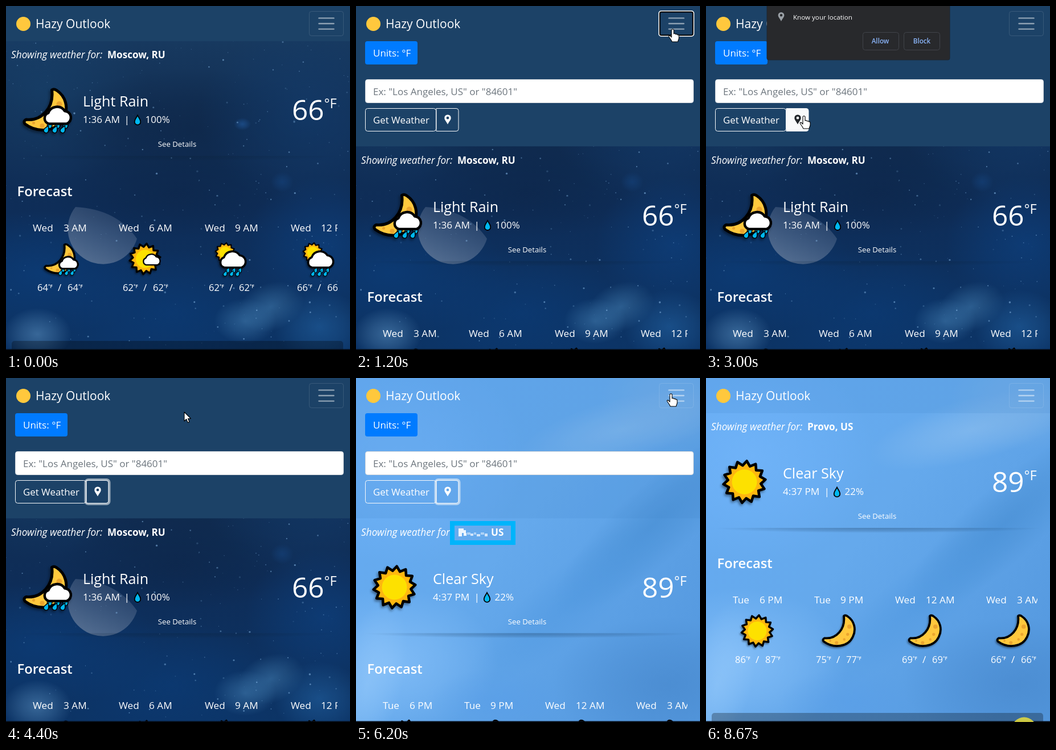
These frames come from a looping animation (604 by 606 pixels, 8740 ms). An HTML page:

```html
<!DOCTYPE html>
<html lang="en">
<head>
<meta charset="utf-8">
<title>Weather app</title>
<style>
  html, body { margin: 0; width: 100%; height: 100%; overflow: hidden; background: #10294d; }
  svg { display: block; width: 100vw; height: 100vh; font-family: "Open Sans", "Noto Sans", sans-serif; fill: #fff; }
  text { white-space: pre; }
  .icon { filter: drop-shadow(-2px 3px 2px rgba(0, 0, 0, .4)); }
</style>
</head>
<body>
<svg id="stage" viewBox="0 0 604 606" preserveAspectRatio="none"></svg>
<script>
const LOOP = 8740, NAV = 62, MENU = 185.5;
const OPEN = [960, 1170], CLOSE = [6480, 6665];

const text = (x, y, size, str, attrs = '') => `<text x="${x}" y="${y}" font-size="${size}" ${attrs}>${str}</text>`;
const rect = (x, y, w, h, attrs) => `<rect x="${x}" y="${y}" width="${w}" height="${h}" ${attrs}/>`;
const circle = (x, y, r, fill) => `<circle cx="${x}" cy="${y}" r="${r}" fill="${fill}"/>`;
const group = (id, body, attrs = '') => `<g id="${id}" ${attrs}>${body}</g>`;

let blobCount = 0;
function blob(x, y, rx, ry, color, opacity, turn = 0) {
  const id = 'blob' + blobCount++;
  return `<radialGradient id="${id}"><stop stop-color="${color}" stop-opacity="${opacity}"/>
    <stop offset=".5" stop-color="${color}" stop-opacity="${opacity * .55}"/>
    <stop offset="1" stop-color="${color}" stop-opacity="0"/></radialGradient>
    <ellipse rx="${rx}" ry="${ry}" fill="url(#${id})" transform="translate(${x} ${y}) rotate(${turn})"/>`;
}

let seed = 7;
const random = () => (seed = seed * 16807 % 2147483647) / 2147483647;

// Backdrops stay fixed while the page moves over them.
function nightSky() {
  let stars = '';
  for (let i = 0; i < 300; i++) {
    stars += `<circle cx="${(random() * 604).toFixed(1)}" cy="${(random() * 606).toFixed(1)}"
      r="${(.5 + random() ** 3 * 1.3).toFixed(2)}" fill="#8fc1ee" opacity="${(.15 + random() * .4).toFixed(2)}"/>`;
  }
  return rect(0, 0, 604, 606, 'fill="url(#night)"')
    + blob(60, 150, 190, 170, '#18446f', .55) + blob(330, 220, 260, 110, '#0d2546', .6)
    + blob(530, 190, 190, 160, '#133f73', .55) + blob(300, 330, 220, 80, '#0c2446', .55)
    + blob(60, 470, 210, 110, '#0b4080', .6) + blob(290, 540, 200, 110, '#0b3c78', .6)
    + blob(560, 420, 140, 120, '#0e4384', .6) + blob(415, 208, 15, 11, '#2563ae', .5)
    + blob(485, 310, 20, 18, '#1b569f', .3) + blob(420, 555, 55, 40, '#3f78ab', .6)
    + blob(465, 530, 60, 42, '#3f78ab', .6, -20) + blob(550, 565, 80, 65, '#2364a5', .55)
    + blob(55, 578, 60, 46, '#4678a9', .75)
    + '<path d="M122 354A62 62 0 1 0 230 410Q195 358 122 354Z" fill="url(#moonGlow)"/>' + stars;
}

const daySky = () => rect(0, 0, 604, 606, 'fill="url(#day)"')
  + blob(80, 140, 220, 190, '#76b8fd', .6) + blob(470, 90, 190, 55, '#8fc0ef', .6, -15)
  + blob(560, 40, 130, 90, '#7db2e6', .6) + blob(520, 260, 230, 65, '#4289cd', .55, -42)
  + blob(380, 390, 240, 60, '#4e97df', .5, -40) + blob(60, 500, 190, 130, '#8cc4fb', .65)
  + blob(20, 540, 60, 150, '#98cbfb', .5, 15) + blob(545, 540, 200, 120, '#4686ca', .6)
  + blob(250, 570, 120, 60, '#579de8', .5);

// Icons are drawn around the origin, about 80 units wide.
const ink = (width) => `stroke="#000" stroke-width="${width}" stroke-linejoin="round"`;

function sun(x = 0, y = 0, scale = 1, n = 14) {
  const points = Array.from({ length: 2 * n }, (_, i) => {
    const r = i % 2 ? 29 : 37, a = (i + .5) * Math.PI / n;
    return `${(r * Math.sin(a)).toFixed(1)},${(-r * Math.cos(a)).toFixed(1)}`;
  });
  return `<g transform="translate(${x} ${y}) scale(${scale})">
    <polygon points="${points.join(' ')}" fill="#ffb70f" ${ink(4.6)}/>${circle(0, 0, 22, '#fde100')}</g>`;
}

const moon = () => `<path d="M12-35Q16-38 21-34C36-24 42-4 33 14C22 38-12 42-35 25Q-39 20-33 17C-6 20 16-4 12-35Z"
  fill="#ffc83d" ${ink(5)}/>` + [[25, -10, 5], [21, 8, 3.5], [-5, 28, 4], [13, 20, 3], [-20, 23, 2.5]]
  .map(([x, y, r]) => circle(x, y, r, '#eba52f')).join('');

const cloud = (x, y, scale, width = 5) => `<path transform="translate(${x} ${y}) scale(${scale})"
  d="M-17 16A11 11 0 0 1-18-5A18 18 0 0 1 14-9A13 13 0 0 1 18 16Z" fill="#fff" ${ink(width)}/>`;

const drop = (x, y, scale, turn = 0) => `<path transform="translate(${x} ${y}) rotate(${turn}) scale(${scale})"
  d="M0-8C2-4 5-1 5 3A5 5 0 0 1-5 3C-5-1-2-4 0-8Z" fill="#00b7f0" stroke="#000" stroke-width="1.700"/>`;

const rain = (x, y) => [[0, 0], [14, 0], [28, 0], [-6, 8], [9, 8], [23, 8]]
  .map(([dx, dy]) => drop(x + dx, y + dy, .85, 25)).join('');

const icons = {
  sun, moon,
  moonRain: () => moon() + rain(9, 26) + cloud(22, 10, .9),
  sunCloud: () => sun() + cloud(16, 2, .78, 4),
  sunRain: () => sun(-15, -15, .62, 12) + rain(-8, 26) + cloud(3, 2, 1.15, 4.2)
};
const icon = (name, x, y, scale) =>
  `<g class="icon" transform="translate(${x} ${y}) scale(${scale})">${icons[name]()}</g>`;

const night = {
  sky: 'Light Rain', time: '1:36 AM', humidity: '100%', dropX: 231, temp: 66, icon: 'moonRain', iconX: 68.5,
  slots: [
    [47, 'Wed', 101, '3 AM', 'moonRain', 94, .71, 55, 64, 64],
    [198, 'Wed', 251, '6 AM', 'sunCloud', 244, .73, 205, 62, 62],
    [349, 'Wed', 402, '9 AM', 'sunRain', 396, .75, 356, 62, 62],
    [500, 'Wed', 553, '12 PM', 'sunRain', 550, .75, 511, 66, 66]
  ]
};
const day = {
  sky: 'Clear Sky', time: '4:37 PM', humidity: '22%', dropX: 230, temp: 89, icon: 'sun', iconX: 67.5,
  slots: [
    [47, 'Tue', 94, '6 PM', 'sun', 90, .75, 51, 86, 87],
    [190, 'Tue', 236, '9 PM', 'moon', 233, .75, 193, 75, 77],
    [332, 'Wed', 386, '12 AM', 'moon', 384, .75, 344, 69, 69],
    [492, 'Wed', 546, '3 AM', 'moon', 539, .75, 500, 66, 66]
  ]
};

const slot = ([dayX, dayName, hourX, hour, name, x, scale, tempX, low, high]) =>
  text(dayX, 397, 17.2, dayName) + text(hourX, 397, 17.2, hour) + icon(name, x, 445.5, scale)
  + text(tempX, 502, 16.5, low) + text(tempX + 19, 497, 8, '°F', 'font-weight="600"')
  + text(tempX + 36, 502, 17, '/') + text(tempX + 53, 502, 16.5, high)
  + text(tempX + 72, 497, 8, '°F', 'font-weight="600"');

const weather = (id, w) => group(id,
  icon(w.icon, w.iconX, 183, 1) + text(135, 177, 25.1, w.sky) + text(135, 206, 17.2, w.time) + text(207.5, 206, 17.2, '|')
  + drop(w.dropX, 201, 1.05) + text(w.dropX + 13.5, 206, 17, w.humidity)
  + `<g class="temp">${text(502, 201, 49.5, w.temp)}${text(558.5, 180, 23.5, '°F')}</g>`
  + `<g class="details">${text(300.5, 248, 13.2, 'See Details', 'text-anchor="middle"')}</g>`
  + `<g clip-path="url(#forecastClip)">${w.slots.map(slot).join('')}</g>`);

const mosaic = [[180, 265, 9, 8], [180, 273, 6, 6], [189, 268, 4, 5], [189, 273, 5, 5], [195, 272, 6, 4], [201, 274, 5, 4],
  [207, 272, 4, 4], [212, 275, 6, 4], [219, 272, 6, 4], [226, 274, 5, 5]]
  .map(([x, y, w, h], i) => rect(x, y - MENU, w, h, `fill="#f4f9ff" opacity="${i < 4 ? .95 : i % 2 ? .75 : .5}"`)).join('');

const pin = (x, y, scale) => `<path transform="translate(${x} ${y}) scale(${scale})" fill-rule="evenodd"
  d="M0 9C-2 4-6 1-6-3A6 6 0 0 1 6-3C6 1 2 4 0 9ZM0-5.5A2.5 2.5 0 1 0 0-.5A2.5 2.5 0 1 0 0-5.5Z"/>`;

const bars = [21.4, 31, 40.6].map(y => `<path d="M549.500 ${y}H575.500"/>`).join('');
const bold = 'font-weight="700"';

stage.innerHTML = `<defs>
  <linearGradient id="night" x2="0" y2="1"><stop stop-color="#1a3e65"/><stop offset=".3" stop-color="#122f54"/>
    <stop offset=".6" stop-color="#0e2d58"/><stop offset="1" stop-color="#0c3466"/></linearGradient>
  <linearGradient id="day" x2="1" y2=".8"><stop stop-color="#65abf2"/><stop offset=".5" stop-color="#65a9ec"/>
    <stop offset="1" stop-color="#5599df"/></linearGradient>
  <linearGradient id="moonGlow" x1=".1" y1="1" x2=".7" y2="0"><stop stop-color="#8392a9" stop-opacity=".65"/>
    <stop offset="1" stop-color="#5c7294" stop-opacity=".28"/></linearGradient>
  <radialGradient id="shade"><stop stop-color="#0a2038" stop-opacity=".28"/>
    <stop offset=".6" stop-color="#0a2038" stop-opacity=".15"/><stop offset="1" stop-color="#0a2038" stop-opacity="0"/></radialGradient>
  <clipPath id="forecastClip"><rect id="forecastWindow" x="20" y="360" width="562" height="200"/></clipPath>
  <clipPath id="shadeClip">${rect(0, 264, 604, 20, '')}</clipPath>
  <clipPath id="navClip"><rect id="navWindow" width="604" height="62"/></clipPath>
  </defs>`
  + group('nightSky', nightSky()) + group('daySky', daySky())
  + group('page',
    text(9, 92, 17.3, 'Showing weather for:', 'font-style="italic"')
    + group('nightCity', text(178, 92, 17.1, 'Moscow, RU', bold))
    + group('dayCity', text(178, 92, 17.1, 'Provo, US', bold))
    + group('hiddenCity', mosaic + text(237, 92, 17.1, 'US', bold))
    + '<ellipse cx="302" cy="264" rx="290" ry="9" fill="url(#shade)" clip-path="url(#shadeClip)"/>'
    + text(19.5, 335, 23.8, 'Forecast', 'font-weight="600"')
    + weather('nightWeather', night) + weather('dayWeather', day)
    + rect(10, 590, 582, 100, 'rx="5" fill="#000" opacity=".28"'))
  + group('nav', '<rect id="navBack" width="604"/>'
    + circle(30.5, 31.5, 12.5, '#ffc83d') + text(52, 38.5, 21, 'Hazy Outlook')
    + rect(16, 62, 92, 41, 'rx="4" fill="#007bff"') + text(30, 89, 17, 'Units: °F')
    + rect(16.5, 129.5, 576, 41, 'rx="4" stroke="#ced4da"')
    + text(30, 157, 17, 'Ex: "Los Angeles, US" or "84601"', 'fill="#6c757d"')
    + rect(16.5, 180.5, 124, 40, 'rx="4" fill="none" stroke="#f8f9fa"') + text(30, 207, 16.9, 'Get Weather')
    + rect(139.5, 179, 42, 43, 'id="pinFocus" rx="5" fill="none" stroke="#f8f9fa" stroke-opacity=".55" stroke-width="4"')
    + '<path id="pinButton" d="M141 180.500H176Q180 180.500 180 184.500V216.500Q180 220.500 176 220.500H141Z" stroke="#f8f9fa"/>'
    + group('pinIcon', pin(161, 200, .95))
    + rect(532.5, 9.5, 60, 43, 'rx="4" fill="none" stroke="#fff" stroke-opacity=".12"')
    + `<g stroke="#fff" stroke-opacity=".5" stroke-width="2.400" stroke-linecap="round">${bars}</g>`
    + group('menuFocus', rect(532, 9, 61, 44, 'rx="4" stroke="#fff" stroke-width="2"')
      + rect(533.5, 10.5, 58, 41, 'rx="3" stroke="#000" stroke-width="2"'), 'fill="none"'), 'clip-path="url(#navClip)"')
  + rect(169, 256, 107, 34, 'id="callout" fill="none" stroke="#00b4fb" stroke-width="8"')
  + group('prompt', rect(107, -4, 321, 99, 'rx="3" fill="#28292c" stroke="#1d2630"')
    + `<g fill="#9aa0a6">${pin(132, 19, .9)}</g>` + text(153, 24, 11.6, 'Know your location')
    + rect(275.5, 46.5, 63, 31, 'id="allow" rx="4" stroke="#41444a"')
    + rect(347.5, 46.5, 63, 31, 'rx="4" fill="none" stroke="#41444a"')
    + text(306, 66, 11.7, 'Allow', 'fill="#8ab4f8" font-weight="600" text-anchor="middle"')
    + text(379, 66, 11.7, 'Block', 'fill="#8ab4f8" font-weight="600" text-anchor="middle"'))
  + rect(0, 604.5, 604, 2, 'fill="#050b14"')
  + group('clickSpot', circle(558.5, 619, 21.5, '#e6dc3c'), 'opacity=".85"')
  + group('cursor',
    '<path id="arrow" d="M0 0V16L3.700 12.500L6.300 18.500L9 17.300L6.500 11.500H11.500Z"/>'
    + `<path id="hand" d="M-2 1Q0-1.500 2 1V8Q4 6.500 5.500 9Q7.500 7.500 8.500 10Q11 9 11 12V16Q10 19 9 22H-1Q-3 18-6 14
      Q-8 11-5 11L-2 14Z"/>`, 'stroke="#000" stroke-width="1.100" stroke-linejoin="round"');

const $ = id => document.getElementById(id);
const show = (id, on) => $(id).setAttribute('display', on ? 'inline' : 'none');
const set = (id, name, value) => $(id).setAttribute(name, value);
const ease = u => u * u * (3 - 2 * u);
const progress = (t, [from, to]) => ease(Math.min(1, Math.max(0, (t - from) / (to - from))));
const inside = ([x, y], left, top, right, bottom) => x >= left && x <= right && y >= top && y <= bottom;

const route = [[70, 575, 625], [800, 556, 41], [1270, 556, 41], [2060, 172, 194], [3330, 172, 194], [4130, 313, 60],
  [5470, 313, 60], [6130, 553, 28], [6870, 553, 28], [7330, 560, 56], [7600, 560, 56], [8400, 558, 625], [LOOP, 558, 625]];

function cursorAt(t) {
  const next = route.findIndex(stop => stop[0] > t);
  if (next < 1) return [575, 625];
  const [t0, x0, y0] = route[next - 1], [t1, x1, y1] = route[next];
  const u = progress(t, [t0, t1]);
  return [x0 + (x1 - x0) * u, y0 + (y1 - y0) * u];
}

function draw(t) {
  const isDay = t >= 4660, wide = isDay && t < 5060;
  const open = progress(t, OPEN) - progress(t, CLOSE);
  const masked = isDay && t < CLOSE[0];
  const navHeight = NAV + MENU * open;

  for (const part of ['Sky', 'Weather']) {
    show('night' + part, !isDay);
    show('day' + part, isDay);
  }
  show('nightCity', !isDay);
  show('dayCity', isDay && !masked);
  show('hiddenCity', masked);

  set('page', 'transform', `translate(0 ${navHeight - NAV})`);
  set('navBack', 'height', navHeight);
  set('navWindow', 'height', navHeight);
  set('navBack', 'fill', isDay ? 'rgba(65,132,198,.16)' : '#1c4267');
  document.querySelectorAll('.temp').forEach(el => el.setAttribute('transform', `translate(${wide ? 8 : 0} 0)`));
  document.querySelectorAll('.details').forEach(el => el.setAttribute('transform', `translate(${wide ? 4 : 0} 0)`));
  set('forecastWindow', 'width', wide ? 570 : 562);

  const at = cursorAt(t);
  const onMenu = inside(at, 532, 9, 593, 53);
  const onPin = open === 1 && inside(at, 141, 180, 180, 221);
  set('cursor', 'transform', `translate(${at})`);
  show('hand', onMenu || onPin);
  show('arrow', !onMenu && !onPin);
  set('pinButton', 'fill', onPin ? '#f8f9fa' : 'none');
  set('pinIcon', 'fill', onPin ? '#212529' : '#fff');
  show('pinFocus', t > 2330 && t < CLOSE[0] && !onPin);
  show('menuFocus', t >= OPEN[0] - 30 && t < 2330 || t >= CLOSE[0] - 10 && t < 8670);

  show('prompt', t >= 2530 && t < 4400);
  set('allow', 'fill', inside(at, 275, 46, 339, 78) ? '#32363d' : 'none');
  show('callout', t >= 5470 && t < CLOSE[0]);
  show('clickSpot', t >= 8670);
}

function tick() {
  draw(performance.now() % LOOP);
  requestAnimationFrame(tick);
}
tick();
</script>
</body>
</html>
```
